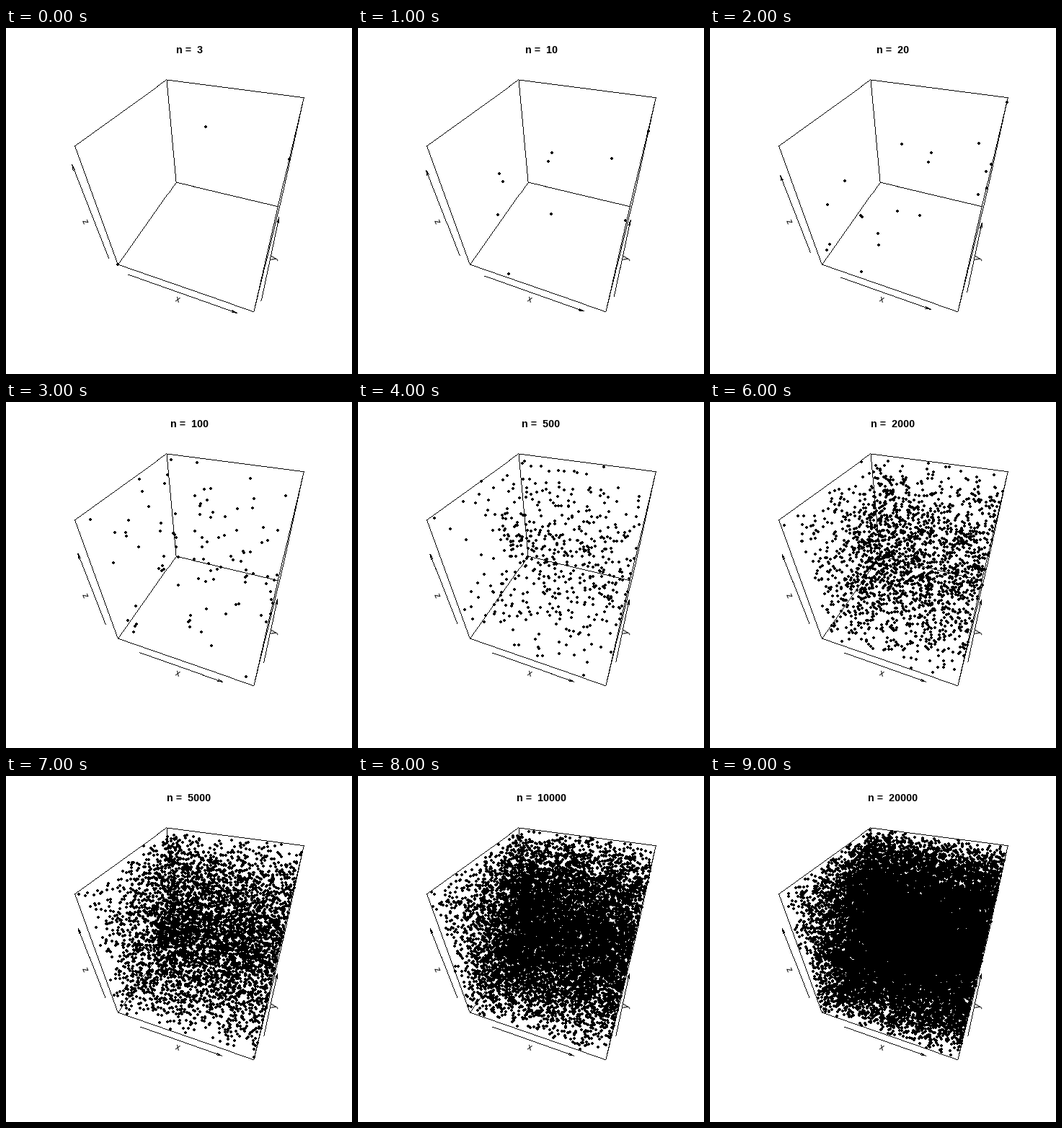
A matplotlib script for the animation above (10000 ms loop, 480 by 480 pixels).

```python
import math
import numpy as np
import matplotlib.pyplot as plt
from matplotlib.animation import FuncAnimation

SIZE, DPI = 480, 100
PX = 72 / DPI
COUNTS = [3, 10, 20, 100, 500, 1000, 2000, 5000, 10000, 20000]
THETA, PHI = np.radians(20), np.radians(40)
EYE = np.sqrt(3) + 2
SCALE, CX, CY = 374.58, 277.94, 218.18
ARROW_GAP, LABEL_GAP = 0.06, 0.13
# Direction in which each axis is moved away from the box
OUTWARD = np.array([(0, -1, -1), (1, 0, -1), (-1, -1, 0)])


def project(p):
    """Perspective view of points in the cube [-1, 1]^3, in stage pixels."""
    x, y, z = np.asarray(p, float).T
    depth = x * np.sin(THETA) - y * np.cos(THETA)
    across = x * np.cos(THETA) + y * np.sin(THETA)
    up = z * np.cos(PHI) - depth * np.sin(PHI)
    w = EYE - z * np.sin(PHI) - depth * np.cos(PHI)
    return np.stack([CX + SCALE * across / w, CY - SCALE * up / w], axis=-1)


def stroke(img, p, q):
    """Hard-edged line one pixel wide."""
    steps = int(np.abs(q - p).max()) + 2
    t = np.linspace(0, 1, steps)[:, None]
    col, row = np.floor(p + t * (q - p)).astype(int).T
    img[row, col] = 0


def draw_box(img):
    """The four faces that lie behind the cloud."""
    for axis, side in [(0, -1), (0, 1), (1, 1), (2, -1)]:
        ring = np.array([(-1, -1), (1, -1), (1, 1), (-1, 1), (-1, -1)])
        corners = project(np.insert(ring, axis, side, axis=1))
        for p, q in zip(corners, corners[1:]):
            stroke(img, p, q)


def draw_dots(img, n):
    """Uniform sample stretched to fill the box, as round 4-pixel dots."""
    p = np.random.default_rng(40 + n).random((n, 3))
    p = (p - p.min(0)) / (p.max(0) - p.min(0))
    col, row = np.rint(project(2 * p - 1)).astype(int).T
    for dx in range(-2, 2):
        for dy in range(-2, 2):
            if abs(dx + 0.5) + abs(dy + 0.5) < 3:
                img[row + dy, col + dx] = 0


def reach(n):
    """Outermost round tick within the expected range of n uniform values."""
    low = 1 / (n + 1)
    step = 0.2 if low < 0.2 else 0.1
    tick = math.ceil(low / step) * step
    return 1 - 2 * (tick - low) / (1 - 2 * low)


def axis_points(axis, gap, values):
    """Points along one axis, shifted outward from its box edge."""
    p = np.tile(OUTWARD[axis] * (1 + gap), (len(values), 1)).astype(float)
    p[:, axis] = values
    return project(p)


def draw_arrow(img, p, q, head=7.2, spread=np.radians(10)):
    stroke(img, p, q)
    back = np.arctan2(*(p - q)[::-1])
    for a in (back - spread, back + spread):
        stroke(img, q, q + head * np.array([np.cos(a), np.sin(a)]))


fig = plt.figure(figsize=(SIZE / DPI, SIZE / DPI), dpi=DPI, facecolor="white")
ax = fig.add_axes([0, 0, 1, 1])
ax.axis("off")

box = np.ones((SIZE, SIZE))
draw_box(box)
picture = ax.imshow(box, cmap="gray", vmin=0, vmax=1, aspect="auto",
                    extent=(0, SIZE, SIZE, 0), interpolation="nearest")

font = dict(family="Liberation Sans", ha="center")
title = ax.text(254, 35, "", fontsize=14.2 * PX, weight="bold",
                va="baseline", **font)
for axis, name in enumerate("xyz"):
    (x0, y0), (x, y), (x1, y1) = axis_points(axis, LABEL_GAP, [-0.6, 0, 0.6])
    angle = np.degrees(np.arctan((y0 - y1) / (x1 - x0)))
    ax.text(x - 1, y, name, fontsize=12 * PX, rotation=angle,
            va="center", **font)


def draw(i):
    n = COUNTS[i]
    img = box.copy()
    draw_dots(img, n)
    end = reach(n)
    for axis in range(3):
        draw_arrow(img, *axis_points(axis, ARROW_GAP, [-end, end]))
    picture.set_data(img)
    title.set_text(f"n =  {n}")
    return picture, title


anim = FuncAnimation(fig, draw, frames=len(COUNTS), interval=1000,
                     repeat=True, repeat_delay=0)
plt.show()
```
